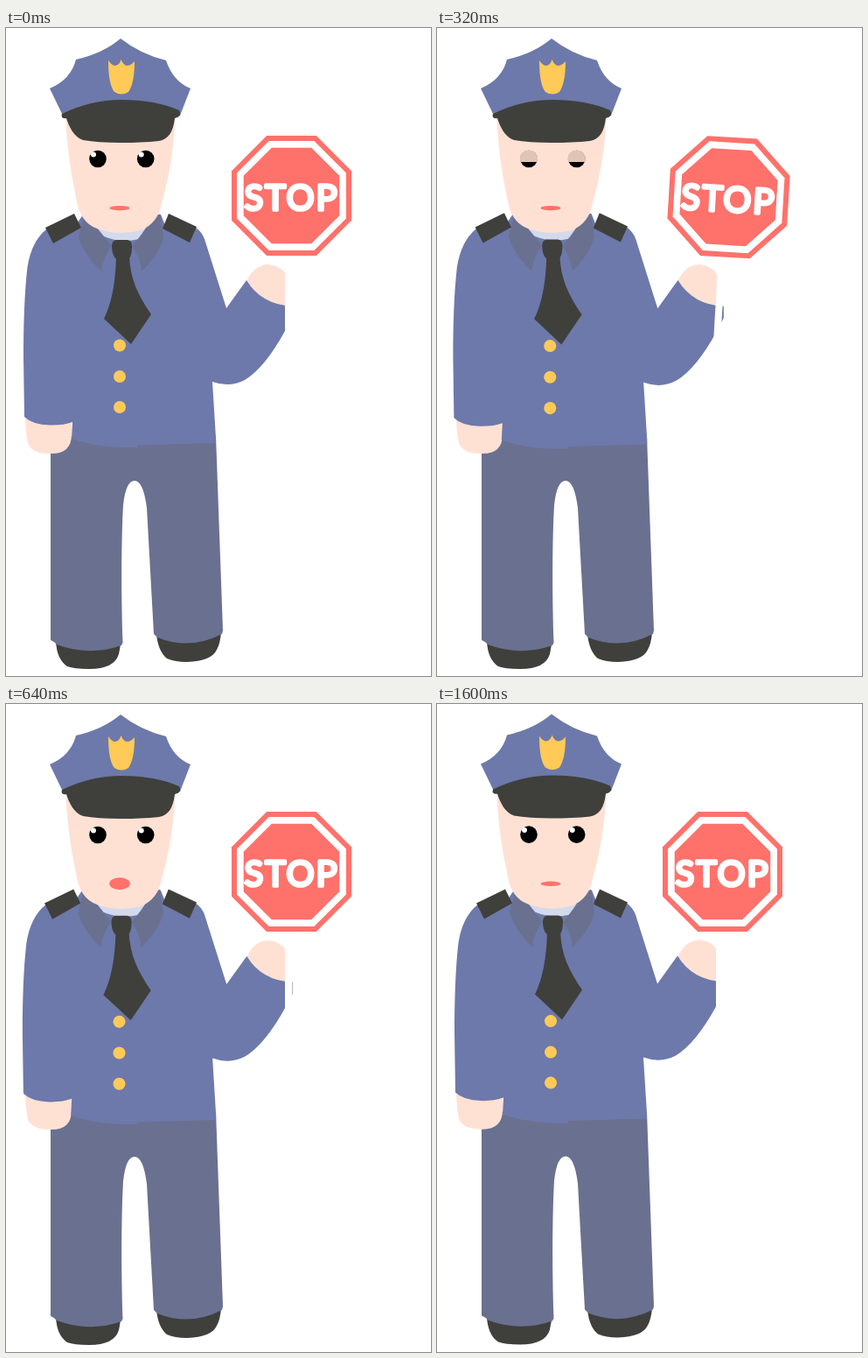
Animation of 486 by 740 pixels, one loop 1760 ms. Source, as an HTML page with a canvas:

```html
<!DOCTYPE html>
<html lang="en">
<head>
<meta charset="utf-8">
<title>Stop</title>
<style>
  html, body { margin: 0; width: 100%; height: 100%; overflow: hidden; background: #fff; }
  canvas { display: block; }
</style>
</head>
<body>
<canvas id="stage" width="486" height="740"></canvas>
<script>
const ctx = document.getElementById('stage').getContext('2d');
const LOOP = 1760, STEP = 80;
const BLUE = '#6d79aa', GREY = '#6a7090', DARK = '#3f403c', SKIN = '#ffe1d4',
      RED = '#ff716b', GOLD = '#ffca57', LID = '#dfc5b5', PALE = '#d3daec';

const shape = d => new Path2D(d);
const pants = shape('M51 466V699Q56 701 58 704Q95 718 132 705L133.500 702C131.500 640 132 580 134 545Q137 517 147 517Q157 517 161 548L169 692L173 696Q210 711 247 692L248 688L240 466Z');
const leftShoe = shape('M57 700Q58 721 70 729Q78 732 95 732Q124 732 129 715L131 704Z');
const rightShoe = shape('M172 692Q174 712 184 720Q193 724 207 724Q235 723 241 710Q245 703 246 690Z');
const leftHand = shape('M22 440Q22 460 25 474Q29 486 50 486Q75 487 75 464V445Z');
const rightHand = shape('M275 290Q283 271 299 270Q314 271 320 281L326 290V322H300Z');
const torso = shape('M46 230Q29 244 24.500 273C21 303 20 340 20 375L21 444Q30 453 50 453.500Q65 454 76 450L75 469Q105 480 150 479V476.500L240 474V468L236 404Q256 411 273 402Q296 388 319 346L326.900 331V317.500Q292 316 275 288L252 320L227 241Q224 233 217 228H183L177 213H88L82 222Z');
const neck = shape('M104 228L112 238Q131 246 152 241L160 228Z');
const leftCollar = shape('M90 212L83 238Q87 256 109 278Q111 261 121 249L104 229Z');
const rightCollar = shape('M176 212L180 238Q177 256 155 278Q154 262 144 250L160 229Z');
const leftPad = shape('M45 228L78 212L86 228L54 246Z');
const rightPad = shape('M186 212L218 227L210 245L179 229Z');
const knot = shape('M126 242H139Q144 243 144 249Q144 259 141 263H125Q121 258 121 249Q121 243 126 242Z');
const tie = shape('M126 260H141C142 287 151 305 166 327L143 361L112 332Q125 306 126 260Z');
const face = shape('M68 98Q70 148 80 193Q84 222 104 229Q129 238 154 231Q174 223 178 200Q191 156 194 98Z');
const cap = shape('M131 12Q111 29 80 36Q74 59 50 69L65 100H199L211 69Q191 61 183 37Q154 30 131 12Z');
const visor = shape('M64 98Q97 82 132 82Q171 82 198 94Q202 101 193 103C191 119 186 127 175 129Q155 131 131 131Q105 131 88 128C77 124 72 112 69 103Q62 104 64 98Z');
const badge = shape('M117 37Q121 43 125 43Q130 42 131.500 36Q134 42 138 43Q143 43 147 38Q147 63 140 73Q132 78 124 73Q117 65 117 37Z');

function fill(color, ...paths) {
  ctx.fillStyle = color;
  paths.forEach(p => ctx.fill(p));
}

function ellipse(color, x, y, rx, ry = rx) {
  ctx.fillStyle = color;
  ctx.beginPath();
  ctx.ellipse(x, y, rx, ry, 0, 0, Math.PI * 2);
  ctx.fill();
}

function octagon(color, half) {
  const r = half / Math.cos(Math.PI / 8);
  ctx.fillStyle = color;
  ctx.beginPath();
  for (let i = 0; i < 8; i++) {
    const a = (i + 0.5) * Math.PI / 4;
    ctx.lineTo(326.5 + r * Math.cos(a), 191.5 + r * Math.sin(a));
  }
  ctx.fill();
}

function group(draw) {
  ctx.save();
  draw();
  ctx.restore();
}

// Half sine wave between two times, zero outside them
function swell(t, from, to) {
  return t > from && t < to ? Math.sin(Math.PI * (t - from) / (to - from)) : 0;
}

function drawTorso(breath) {
  const s = 1 + 0.01 * breath;
  ctx.translate(215, 300);
  ctx.scale(s, s);
  ctx.translate(-215, -300);
  fill(BLUE, torso);
  fill(PALE, neck);
  fill(GREY, leftCollar, rightCollar);
  fill(DARK, leftPad, rightPad, tie, knot);
  for (const y of [362.5, 398, 433]) ellipse(GOLD, 130, y, 7);
}

function drawEye(x, closed) {
  const y = 149.5, r = 9.8;
  ellipse('#000', x, y, r);
  ellipse('#fff', x - 5, y - 5, 3);
  if (!closed) return;
  group(() => {
    ctx.beginPath();
    ctx.arc(x, y, r + 0.4, 0, Math.PI * 2);
    ctx.clip();
    ctx.fillStyle = LID;
    ctx.fillRect(x - 12, y - 10, 24, 18 * closed);
  });
}

function drawSign(swing) {
  ctx.translate(301, 309);
  ctx.rotate(4.6 * swing * Math.PI / 180);
  ctx.translate(-301, -309);
  ctx.fillStyle = '#fff';
  ctx.fillRect(319, 255, 8, 110);
  octagon(RED, 68.5);
  octagon('#fff', 62.5);
  octagon(RED, 54.8);
  ctx.font = '40px Lato, sans-serif';
  ctx.letterSpacing = '2px';
  ctx.textAlign = 'center';
  ctx.lineJoin = 'round';
  ctx.lineWidth = 3.7;
  ctx.fillStyle = ctx.strokeStyle = '#fff';
  ctx.fillText('STOP', 326.5, 208);
  ctx.strokeText('STOP', 326.5, 208);
}

function drawOfficer(t, blink) {
  const talk = swell(t, 560, 1120);
  if (t >= 1600) ctx.translate(0, -0.4);
  fill(DARK, leftShoe, rightShoe);
  fill(GREY, pants);
  fill(SKIN, leftHand, rightHand);
  group(() => drawTorso(swell(t, 0, 880) ** 2));
  fill(SKIN, face);
  fill(BLUE, cap);
  fill(DARK, visor);
  fill(GOLD, badge);
  drawEye(105, blink);
  drawEye(159.7, blink);
  ellipse(RED, 130, 205.7 - 1.3 * talk, 11.5 + 0.7 * talk, 2.7 + 9.6 * talk);
}

function frame(now) {
  const t = Math.floor(now % LOOP / STEP) * STEP;
  const swing = swell(t, 0, 480) ** 2;
  ctx.fillStyle = '#fff';
  ctx.fillRect(0, 0, 486, 740);
  group(() => drawOfficer(t, swing));
  group(() => drawSign(swing));
  requestAnimationFrame(frame);
}

requestAnimationFrame(frame);
</script>
</body>
</html>
```
